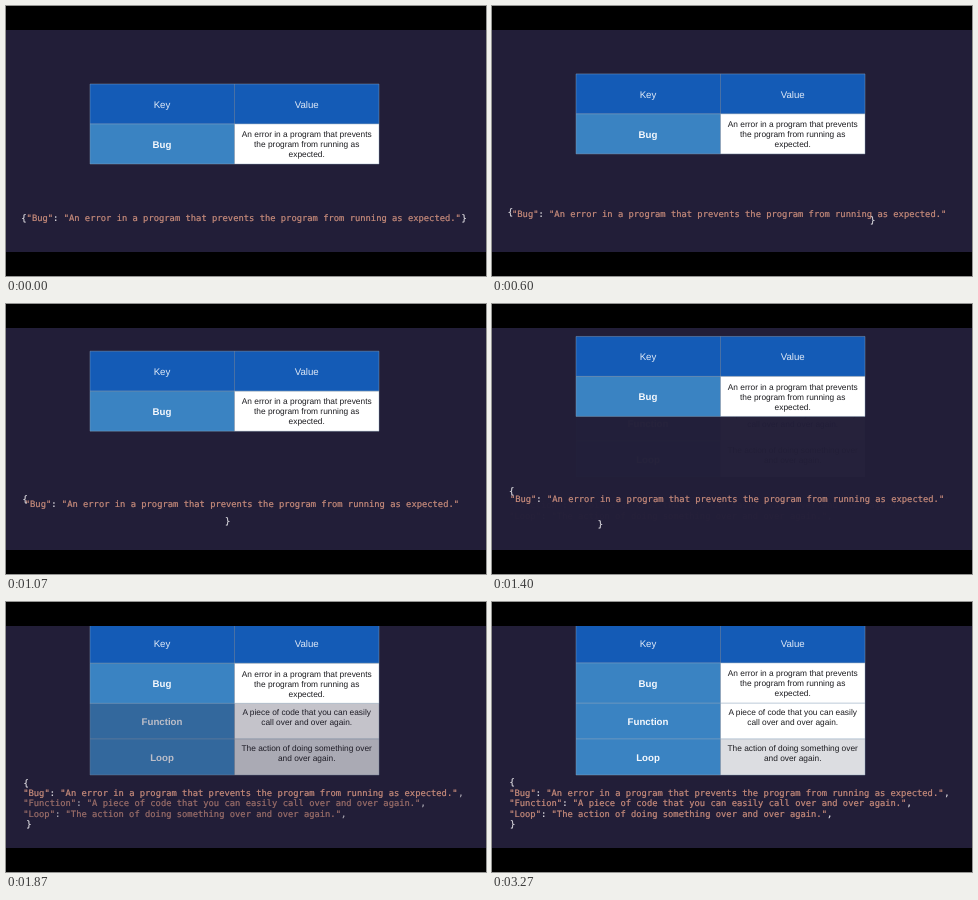
Recreate the animation shown at these times as an HTML page. Size 480 px wide and 270 px high, loop 3790 ms.

```html
<!DOCTYPE html>
<html lang="en">
<head>
<meta charset="utf-8">
<title>Dictionary of terms</title>
<style>
html, body { margin: 0; width: 100%; height: 100%; overflow: hidden; background: #000; }
svg { display: block; width: 100vw; height: 100vh; }
text { text-rendering: geometricPrecision; white-space: pre; }
.head, .key, .val { text-anchor: middle; font-family: "Liberation Sans", Arial, sans-serif; }
.head { font-size: 9.7px; fill: #dfe9f7; }
.key { font-size: 9.7px; font-weight: bold; fill: #f4f8fd; }
.val { font-size: 8.35px; fill: #1c1c20; }
.code { font-family: "DejaVu Sans Mono", monospace; font-size: 8.81px; fill: #dddbe0; stroke: #dddbe0; stroke-width: .2; }
.str { fill: #ca8d7c; stroke: #ca8d7c; }
.edge { fill: none; stroke: #8fa6bd; stroke-opacity: .6; stroke-width: .7; }
</style>
</head>
<body>
<svg id="stage" viewBox="0 0 480 270">
  <rect width="480" height="270" fill="#221e38"/>
  <g id="newRows"></g>
  <g id="table"></g>
  <g id="entry"></g>
  <g id="newLines"></g>
  <text id="open" class="code">{</text>
  <text id="close" class="code">}</text>
  <rect width="480" height="24"/>
  <rect y="246" width="480" height="24"/>
</svg>
<script>
const LOOP = 3790, STEP = 1000 / 15;
const LEFT = 84, SPLIT = 228.5, RIGHT = 373, CODE_X = 17.2, CODE_Y = 193.6, PITCH = 5.304;
const $ = id => document.getElementById(id);

function add(parent, tag, attrs, content = "") {
  const el = document.createElementNS("http://www.w3.org/2000/svg", tag);
  for (const name in attrs) el.setAttribute(name, attrs[name]);
  el.textContent = content;
  return parent.appendChild(el);
}

function cells(parent, y, h, keyFill, valueFill) {
  add(parent, "rect", { x: LEFT, y, width: SPLIT - LEFT, height: h, fill: keyFill });
  add(parent, "rect", { x: SPLIT, y, width: RIGHT - SPLIT, height: h, fill: valueFill });
  add(parent, "path", { class: "edge", d: `M${LEFT} ${y}H${RIGHT}v${h}H${LEFT}zM${SPLIT} ${y}v${h}` });
}

function row(parent, y, h, fill, key, keyY, lines, lineY) {
  cells(parent, y, h, "#3a83c2", fill);
  add(parent, "text", { class: "key", x: 156, y: keyY }, key);
  lines.forEach((line, i) =>
    add(parent, "text", { class: "val", x: 300.7, y: lineY + i * 10 }, line));
}

function pair(parent, x, y, key, value) {
  const line = add(parent, "text", { class: "code", x, y });
  const span = (cls, s) => add(line, "tspan", { class: cls }, s);
  span("str", `"${key}"`);
  span("", ": ");
  span("str", `"${value}"`);
  return line;
}

const bug = ["An error in a program that prevents", "the program from running as", "expected."];
const func = ["A piece of code that you can easily", "call over and over again."];
const loop = ["The action of doing something over", "and over again."];

// The table's own origin is its top edge.
cells($("table"), 0, 40, "#145bb6", "#145bb6");
add($("table"), "text", { class: "head", x: 156, y: 23.6 }, "Key");
add($("table"), "text", { class: "head", x: 300.7, y: 23.6 }, "Value");
row($("table"), 40, 40, "#fff", "Bug", 63.8, bug, 53.3);

row($("newRows"), 101, 36, "#fff", "Function", 122.8, func, 112.5);
row($("newRows"), 137, 36, "#dcdde1", "Loop", 159.2, loop, 149);

pair($("entry"), 0, 0, "Bug", bug.join(" "));

// Later lines, and the comma that follows the first entry.
add($("newLines"), "text", { class: "code", x: CODE_X + PITCH * 82, y: CODE_Y }, ",");
[["Function", func], ["Loop", loop]].forEach(([key, lines], i) => {
  const line = pair($("newLines"), CODE_X, CODE_Y + (i + 1) * 10.5, key, lines.join(" "));
  add(line, "tspan", {}, ",");
});

const clamp = v => Math.min(1, Math.max(0, v));
const mix = (a, b, p) => a + (b - a) * p;

function draw(ms) {
  const t = Math.floor(ms / STEP + 0.02) * STEP;
  const p = (1 - Math.cos(Math.PI * clamp((t - 83) / 1870))) / 2;
  const move = (id, x0, y0, x1, y1) =>
    $(id).setAttribute("transform", `translate(${mix(x0, x1, p)} ${mix(y0, y1, p)})`);

  move("table", 0, 78, 0, 21);
  move("entry", 20.6, 215, CODE_X, CODE_Y);
  move("open", 15.3, 215, 17.4, 183.4);
  move("close", 455.6, 215, 17.9, 225.1);

  const shown = clamp((t - 1390) / 650);
  $("newRows").setAttribute("opacity", shown);
  $("newLines").setAttribute("opacity", shown);
}

const start = performance.now();
function tick() {
  draw((performance.now() - start) % LOOP);
  requestAnimationFrame(tick);
}
tick();
</script>
</body>
</html>
```
